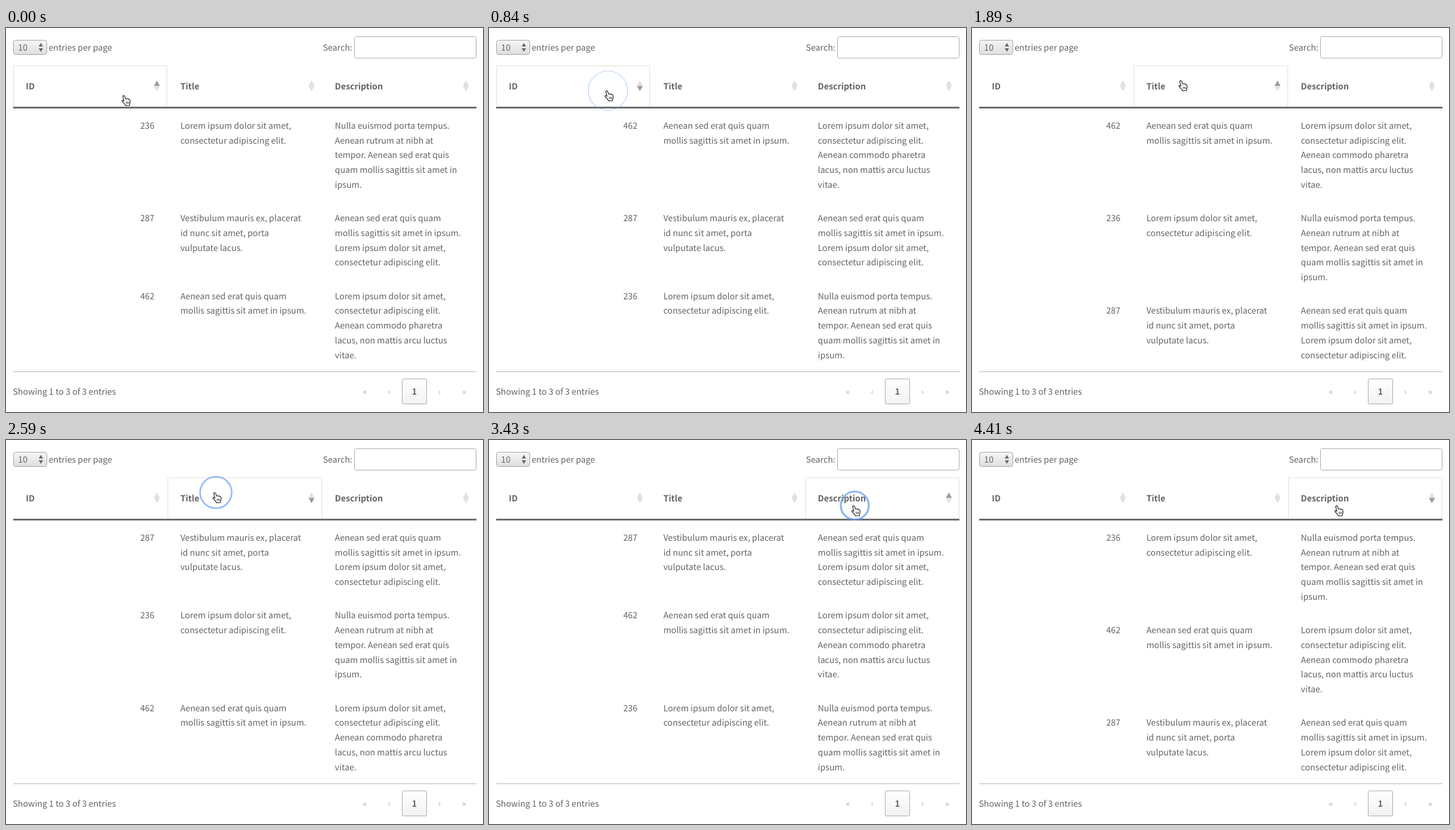
Write an HTML page with a canvas that moves like this. It is 800x644 px and loops after 4.55 s.

```html
<!DOCTYPE html>
<html lang="en">
<head>
<meta charset="utf-8">
<title>Sortable table</title>
<style>
  html, body { margin: 0; width: 100%; height: 100%; overflow: hidden; background: #fff; }
  canvas { display: block; }
</style>
</head>
<body>
<canvas id="stage" width="800" height="644"></canvas>
<script>
const ctx = document.getElementById('stage').getContext('2d');
const LOOP = 4550, STEP = 70;
const FAMILY = '"Noto Sans CJK JP", "Noto Sans CJK SC", "Noto Sans CJK", "Open Sans", sans-serif';
const TEXT = '#646464';
const LINE = 24.72, ROW_PAD = 31.7;

const columns = [
  { name: 'ID', left: 12.5, right: 269.5, x: 33.3, icon: 253 },
  { name: 'Title', left: 271.5, right: 529.5, x: 292.4, icon: 512.4 },
  { name: 'Description', left: 530.8, right: 788.5, x: 551.6, icon: 771.3 }
];

const records = {
  236: {
    title: ['Lorem ipsum dolor sit amet,', 'consectetur adipiscing elit.'],
    text: ['Nulla euismod porta tempus.', 'Aenean rutrum at nibh at', 'tempor. Aenean sed erat quis',
      'quam mollis sagittis sit amet in', 'ipsum.']
  },
  287: {
    title: ['Vestibulum mauris ex, placerat', 'id nunc sit amet, porta', 'vulputate lacus.'],
    text: ['Aenean sed erat quis quam', 'mollis sagittis sit amet in ipsum.', 'Lorem ipsum dolor sit amet,',
      'consectetur adipiscing elit.']
  },
  462: {
    title: ['Aenean sed erat quis quam', 'mollis sagittis sit amet in ipsum.'],
    text: ['Lorem ipsum dolor sit amet,', 'consectetur adipiscing elit.', 'Aenean commodo pharetra',
      'lacus, non mattis arcu luctus', 'vitae.']
  }
};

const sorts = [
  { at: 0, col: 0, asc: true, ids: [236, 287, 462] },
  { at: 770, col: 0, asc: false, ids: [462, 287, 236] },
  { at: 1680, col: 1, asc: true, ids: [462, 236, 287] },
  { at: 2590, col: 1, asc: false, ids: [287, 236, 462] },
  { at: 3430, col: 2, asc: true, ids: [287, 462, 236] },
  { at: 4200, col: 2, asc: false, ids: [236, 462, 287] }
];

const moves = [
  { at: 70, dur: 210, to: [199.5, 105] },
  { at: 1050, dur: 350, to: [352, 88] },
  { at: 2870, dur: 350, to: [613.5, 110] }
];
const clicks = [516, 1429, 2350, 3229, 3946];
const CLICK_TIME = 350;

const hand = new Path2D('M-3.5 2.2Q-3.8.4-2.2.3Q-1 .3-.4 1.8L1.2 6Q2.2 5 3.5 6Q5 5.2 6 6.6Q8 6 8.4 8' +
  'Q9.3 10.5 8.6 12.5L7.8 14.5V16.8L1 17.2Q0 14.5-2 13Q-4.5 10.8-5 9.6Q-5 8-3.2 8.4L-1.6 9.6Z');
const knuckles = new Path2D('M2 10.5L2.4 14M4.1 10.5L4.4 14M6.1 10.5L6.3 14');

const ease = p => p * p * (3 - 2 * p);
const clamp = p => Math.max(0, Math.min(1, p));

function write(str, x, y, { bold = false, align = 'left', color = TEXT, size = 14.2 } = {}) {
  ctx.font = `${bold ? 'bold ' : ''}${size}px ${FAMILY}`;
  ctx.textAlign = align;
  ctx.fillStyle = color;
  ctx.fillText(str, x, y);
}

function box(x, y, w, h, r, stroke, fill) {
  ctx.beginPath();
  ctx.roundRect(x, y, w, h, r);
  ctx.fillStyle = fill;
  ctx.fill();
  ctx.lineWidth = 1;
  ctx.strokeStyle = stroke;
  ctx.stroke();
}

function shade(y0, y1, from, to) {
  const g = ctx.createLinearGradient(0, y0, 0, y1);
  g.addColorStop(0, from);
  g.addColorStop(1, to);
  return g;
}

function triangle(x, base, tip, half, color) {
  ctx.fillStyle = color;
  ctx.beginPath();
  ctx.moveTo(x - half, base);
  ctx.lineTo(x + half, base);
  ctx.lineTo(x, tip);
  ctx.fill();
}

function drawControls() {
  box(12.5, 20.5, 56, 24, 4, '#a2a2a2', shade(20, 45, '#f6f6f6', '#dedede'));
  write('10', 20.3, 38);
  triangle(58.5, 31, 25, 3.6, '#686868');
  triangle(58.5, 34, 40, 3.6, '#686868');
  write('entries per page', 71.4, 38);
  write('Search:', 531.5, 38);
  box(584.5, 14.5, 204, 36, 3, '#aaa', '#fff');
}

function drawHeader(sort, hover) {
  const { left, right } = columns[hover];
  ctx.strokeStyle = '#e9e9e9';
  ctx.lineWidth = 1.6;
  ctx.beginPath();
  ctx.moveTo(left, 132);
  ctx.lineTo(left, 63.5);
  ctx.lineTo(right, 63.5);
  ctx.lineTo(right, 132);
  ctx.stroke();

  columns.forEach((c, i) => {
    const active = i === sort.col;
    write(c.name, c.x, 102.6, { bold: true });
    triangle(c.icon, 97, 88, 5, active && sort.asc ? '#9c9c9c' : '#e0e0e0');
    triangle(c.icon, 97.3, 106, 5, active && !sort.asc ? '#9c9c9c' : '#e0e0e0');
  });
  ctx.fillStyle = '#6c6c6c';
  ctx.fillRect(12, 132, 777, 3);
}

function drawRows(ids) {
  let y = 168.8;
  for (const id of ids) {
    const { title, text } = records[id];
    write(String(id), 248.8, y, { align: 'right' });
    title.forEach((s, i) => write(s, columns[1].x, y + i * LINE));
    text.forEach((s, i) => write(s, columns[2].x, y + i * LINE));
    y += text.length * LINE + ROW_PAD;
  }
}

function drawFooter() {
  ctx.fillStyle = '#b4b4b4';
  ctx.fillRect(12, 576, 777, 1);
  write('Showing 1 to 3 of 3 entries', 11.4, 615);
  box(664.5, 588.5, 41, 42, 2, '#aaa', shade(588, 631, '#fff', '#f2f2f2'));
  write('1', 685, 615, { bold: true, align: 'center' });
  [['«', 601.8], ['‹', 643], ['›', 727], ['»', 768.3]].forEach(([s, x]) =>
    write(s, x, 615, { align: 'center', color: '#acacac' }));
}

function pointerAt(t) {
  let [x, y] = [199.5, 113];
  for (const m of moves) {
    const p = ease(clamp((t - m.at) / m.dur));
    x += (m.to[0] - x) * p;
    y += (m.to[1] - y) * p;
  }
  return [x, y];
}

function drawRing(t, x, y) {
  const start = clicks.find(c => t >= c && t < c + CLICK_TIME);
  if (start === undefined) return;
  const p = (t - start) / CLICK_TIME;
  const fade = Math.min(1, (1 - p) / 0.4);
  ctx.strokeStyle = `rgba(100, 156, 238, ${0.4 + 0.35 * fade})`;
  ctx.lineWidth = 0.7 + 2.5 * fade;
  ctx.beginPath();
  ctx.arc(x, y, 8 + 27 * p, 0, Math.PI * 2);
  ctx.stroke();
}

function drawHand(x, y) {
  ctx.save();
  ctx.translate(x, y);
  ctx.lineJoin = 'round';
  ctx.fillStyle = '#fff';
  ctx.fill(hand);
  ctx.strokeStyle = '#222';
  ctx.lineWidth = 1.2;
  ctx.stroke(hand);
  ctx.lineWidth = 0.9;
  ctx.stroke(knuckles);
  ctx.restore();
}

function draw(now) {
  const t = Math.floor((now % LOOP) / STEP) * STEP;
  const sort = sorts.filter(s => s.at <= t).pop();
  const [x, y] = pointerAt(t);
  const hover = x < 270.5 ? 0 : x < 530 ? 1 : 2;

  ctx.fillStyle = '#fff';
  ctx.fillRect(0, 0, 800, 644);
  ctx.textRendering = 'geometricPrecision';
  drawControls();
  drawHeader(sort, hover);
  drawRows(sort.ids);
  drawFooter();
  drawRing(t, x, y);
  drawHand(x, y);
}

const begin = performance.now();
function tick() {
  draw(performance.now() - begin);
  requestAnimationFrame(tick);
}
tick();
</script>
</body>
</html>
```
